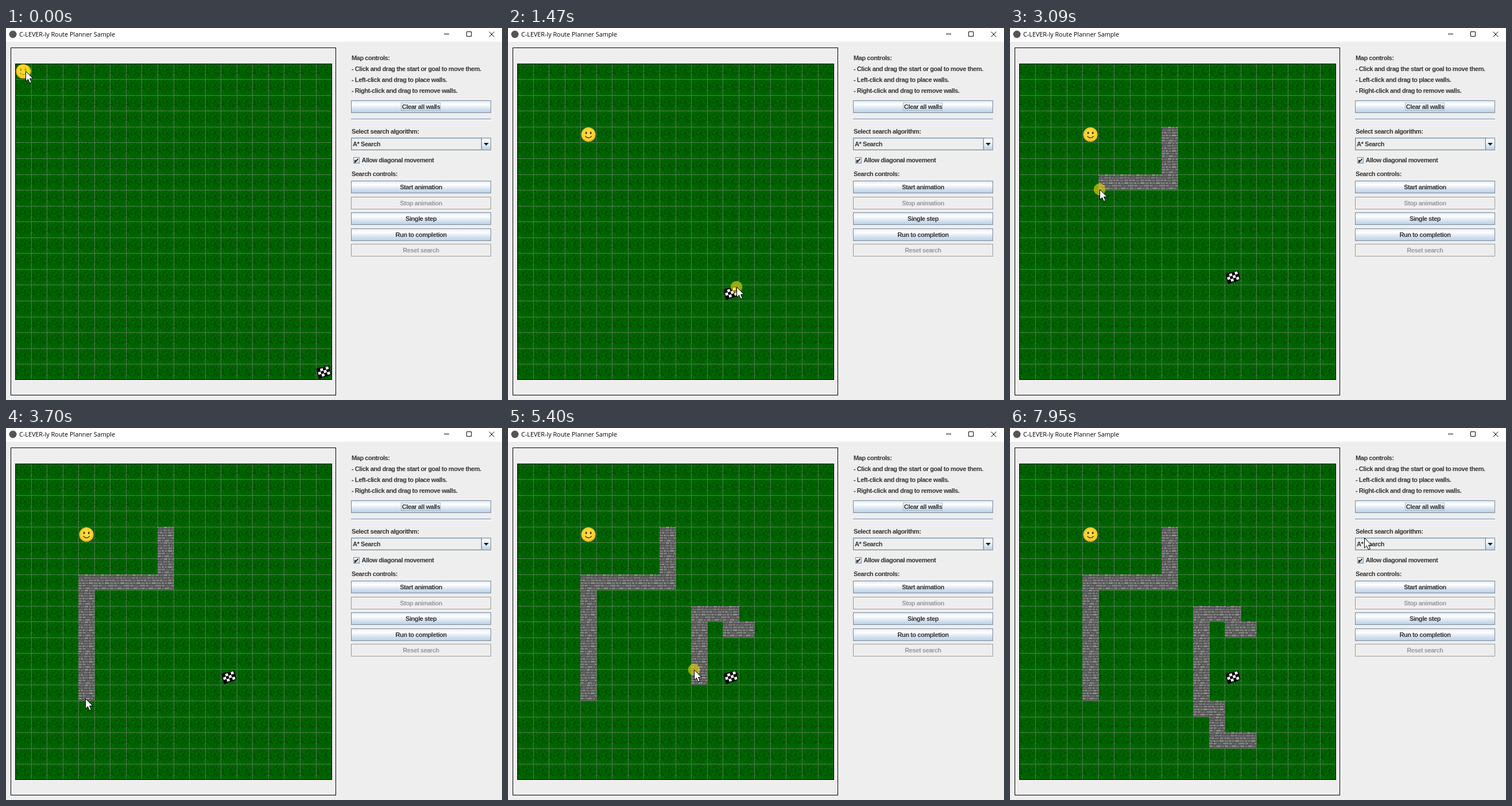
An HTML page with a canvas for the animation above (8 s loop, 864x648 px).

```html
<!DOCTYPE html>
<html lang="en">
<head>
<meta charset="utf-8">
<title>Route planner</title>
<style>
  html, body { margin: 0; width: 100%; height: 100%; overflow: hidden; background: #eee; }
  canvas, svg { position: absolute; left: 0; top: 0; }
  text { font: bold 11px "Liberation Sans", Arial, sans-serif; letter-spacing: -.43px; fill: #333; white-space: pre; }
  .title { font: 10.8px "Open Sans", sans-serif; letter-spacing: 0; fill: #000; }
  .mid { text-anchor: middle; }
  .off { fill: #999; }
</style>
</head>
<body>
<canvas id="map" width="864" height="648"></canvas>
<svg width="864" height="648" viewBox="0 0 864 648">
  <defs>
    <linearGradient id="metal" x2="0" y2="1">
      <stop offset="0" stop-color="#dde8f3"/>
      <stop offset=".3" stop-color="#fff"/>
      <stop offset=".6" stop-color="#dde8f3"/>
      <stop offset="1" stop-color="#b8cfe5"/>
    </linearGradient>
  </defs>
  <rect width="864" height="24" fill="#fff"/>
  <circle cx="12" cy="11" r="6.5" fill="#555"/>
  <text class="title" x="23" y="15">C-LEVER-ly Route Planner Sample</text>
  <path d="M763 10.5h9M802.5 6.5h8v8h-8zM841.5 6.5l9 9m0-9l-9 9" fill="none" stroke="#000"/>
  <rect x="8.5" y="34.5" width="566" height="605" fill="none" stroke="#000"/>

  <text x="602" y="56">Map controls:</text>
  <text x="602" y="75">- Click and drag the start or goal to move them.</text>
  <text x="602" y="94">- Left-click and drag to place walls.</text>
  <text x="602" y="113">- Right-click and drag to remove walls.</text>
  <path d="M601 158.5h244" stroke="#6382bf"/>
  <path d="M601 159.5h244" stroke="#fff"/>

  <text x="602" y="184">Select search algorithm:</text>
  <rect x="601.5" y="191.5" width="243" height="21" fill="#eee" stroke="#7a8a99"/>
  <rect x="602.5" y="192.5" width="225" height="19" fill="none" stroke="#b8cfe5"/>
  <rect x="828.5" y="191.5" width="16" height="21" fill="url(#metal)" stroke="#7a8a99"/>
  <path d="M832 200h9l-4.5 5z" fill="#222"/>
  <text x="604" y="206">A* Search</text>

  <rect x="605.5" y="225.5" width="10" height="10" fill="url(#metal)" stroke="#7a8a99"/>
  <path d="M608 229.5v4l5.5-5.5" fill="none" stroke="#222" stroke-width="1.8"/>
  <text x="619.5" y="234">Allow diagonal movement</text>
  <text x="602" y="258">Search controls:</text>
  <g id="buttons"></g>
  <rect x="688.5" y="130.5" width="68" height="13" fill="none" stroke="#a3b8cc"/>
  <g id="cursor">
    <circle id="press" r="10.3" fill="#f5d70a" fill-opacity=".6"/>
    <path d="M.5 .5v17.5l4-3.8 2.8 6.6 3-1.3-2.8-6.4h5.6z" fill="#fff" stroke="#000"/>
  </g>
</svg>
<script>
const $ = id => document.getElementById(id);
const ctx = $('map').getContext('2d');
const CELL = 27.55, LEFT = 16.55, TOP = 62.2, SIDE = 20, STEP = 77, LOOP = 8000;
const HOVER = 0, START = 1, GOAL = 2, WALL = 3;

// Pointer path: step, x, y and what the pointer does from there on
const path = [
  [0, 34, 75, START], [5, 146, 188, HOVER], [11, 560, 632, HOVER],
  [12.5, 553, 604, GOAL], [17, 378, 463, GOAL], [19, 398, 451, GOAL],
  [22.3, 396, 446, HOVER], [26, 158, 205, HOVER],
  [29, 276, 184, WALL], [33, 278, 250, WALL], [35, 277, 268, WALL], [39, 163, 270, WALL],
  [40, 156, 281, WALL], [41, 137, 279, WALL], [44, 134, 369, WALL],
  [47, 136, 471, HOVER], [49, 140, 470, HOVER], [55, 350, 450, HOVER], [58, 407, 358, HOVER],
  [59, 407, 356, WALL], [61, 388, 352, WALL], [62, 386, 330, WALL], [65.5, 331, 326, WALL],
  [66, 330, 334, WALL], [70, 324, 421, WALL], [73, 323, 485, WALL], [74.5, 358, 488, WALL],
  [77, 370, 525, WALL], [77.4, 370, 534, WALL], [78, 385, 545, WALL], [79, 407, 551, WALL],
  [81.5, 407, 551, HOVER], [86, 141, 120, HOVER], [88, 141, 120, HOVER], [91, 240, 101, HOVER],
  [95, 495, 204, HOVER], [96, 460, 198, HOVER], [97, 460, 198, HOVER], [103, 617, 191, HOVER],
  [105, 617, 191, HOVER]
];

function pointer(n) {
  const i = path.findIndex(p => p[0] > n);
  const [n0, x0, y0, mode] = path[i - 1], [n1, x1, y1] = path[i];
  const k = (n - n0) / (n1 - n0);
  return { x: x0 + (x1 - x0) * k, y: y0 + (y1 - y0) * k, mode };
}

let seed = 7;
const rnd = () => (seed = seed * 16807 % 2147483647) / 2147483647;

function makeTile(draw) {
  const tile = document.createElement('canvas');
  tile.width = tile.height = 28;
  draw(tile.getContext('2d'));
  return tile;
}

const grass = makeTile(c => {
  c.fillStyle = '#005e00';
  c.fillRect(0, 0, 28, 28);
  for (let i = 0; i < 420; i++) {
    const x = rnd() * 30 - 1, y = rnd() * 30 - 1, len = 1 + rnd() * 2.5;
    c.strokeStyle = `rgb(0,${62 + rnd() * 66 | 0},0)`;
    c.beginPath();
    c.moveTo(x, y);
    c.lineTo(x + len * .7, y - len);
    c.stroke();
  }
});

const brick = makeTile(c => {
  c.fillStyle = '#484848';
  c.fillRect(0, 0, 28, 28);
  for (let y = 0; y < 28; y += 4.6)
    for (let x = -rnd() * 6, w; x < 28; x += w) {
      w = 5 + rnd() * 5;
      const g = 105 + rnd() * 45 | 0;
      c.fillStyle = `rgb(${g},${g},${g})`;
      c.fillRect(x, y, w - 1, 2.2);
      c.fillStyle = '#707070';
      c.fillRect(x, y + 2.2, w - 1, 1.2);
    }
});

const edgeX = col => Math.floor(LEFT + col * CELL);
const edgeY = row => Math.floor(TOP + row * CELL);

function putTile(tile, col, row) {
  const x = edgeX(col), y = edgeY(row), w = edgeX(col + 1) - x, h = edgeY(row + 1) - y;
  ctx.drawImage(tile, 0, 0, w, h, x, y, w, h);
}

function atCell([col, row], draw) {
  ctx.save();
  ctx.translate(LEFT + (col + .5) * CELL - .4, TOP + (row + .5) * CELL - .5);
  draw();
  ctx.restore();
}

function smiley() {
  const skin = ctx.createRadialGradient(0, -3, 3, 0, 0, 13);
  skin.addColorStop(0, '#ffdf45');
  skin.addColorStop(.75, '#fdcf2f');
  skin.addColorStop(1, '#f0a31c');
  ctx.fillStyle = skin;
  ctx.beginPath();
  ctx.arc(0, 0, 12.6, 0, 7);
  ctx.fill();
  ctx.fillStyle = ctx.strokeStyle = '#553510';
  for (const x of [-4, 4]) {
    ctx.beginPath();
    ctx.ellipse(x, -3, 1.5, 2.2, 0, 0, 7);
    ctx.fill();
  }
  ctx.lineWidth = 1.4;
  ctx.beginPath();
  ctx.arc(0, -.6, 6.2, .52, Math.PI - .52);
  ctx.stroke();
}

function flag() {
  ctx.fillStyle = '#000';
  ctx.beginPath();
  ctx.moveTo(-13, -5);
  ctx.bezierCurveTo(-5, -10, 0, -6, 9, -12);
  ctx.lineTo(13, 4);
  ctx.bezierCurveTo(6, 10, 0, 7, -8, 13);
  ctx.fill();
  ctx.transform(1, -.32, .28, 1, 0, 0);
  ctx.fillStyle = '#fff';
  for (let row = 0; row < 3; row++)
    for (let col = 0; col < 4; col++)
      if ((row + col) % 2) ctx.fillRect(col * 4.8 - 9.4, row * 4.6 - 6.7, 4.6, 4.5);
}

function drawMap(n) {
  const walls = new Map();
  let start = [0, 0], goal = [19, 19];
  for (let s = 0; s <= n; s += .02) {
    const p = pointer(s);
    const cell = [Math.floor((p.x - LEFT) / CELL), Math.floor((p.y - TOP) / CELL)];
    if (p.mode === START) start = cell;
    if (p.mode === GOAL) goal = cell;
    if (p.mode === WALL) walls.set(cell.join(), cell);
  }

  for (let col = 0; col < SIDE; col++)
    for (let row = 0; row < SIDE; row++) putTile(grass, col, row);
  ctx.fillStyle = 'rgba(140,140,140,.62)';
  for (let i = 1; i < SIDE; i++) {
    ctx.fillRect(edgeX(i), 62, 1, 550);
    ctx.fillRect(16, edgeY(i), 551, 1);
  }
  for (const cell of walls.values()) putTile(brick, ...cell);
  ctx.lineWidth = 1;
  ctx.strokeStyle = '#000';
  ctx.strokeRect(16.5, 62.5, 551, 550);
  atCell(goal, flag);
  atCell(start, smiley);
}

function addButton(y, label, on) {
  $('buttons').innerHTML +=
    `<rect x="601.5" y="${y}.5" width="243" height="21" fill="${on ? 'url(#metal)' : '#eee'}" stroke="${on ? '#7a8a99' : '#999'}"/>
     <text class="mid${on ? '' : ' off'}" x="723" y="${y + 15}">${label}</text>`;
}
addButton(126, 'Clear all walls', true);
addButton(266, 'Start animation', true);
addButton(294, 'Stop animation', false);
addButton(321, 'Single step', true);
addButton(349, 'Run to completion', true);
addButton(376, 'Reset search', false);

let shown = -1;
function frame(now) {
  const n = Math.floor((now % LOOP + 5) / STEP);
  if (n !== shown) {
    shown = n;
    ctx.clearRect(0, 0, 864, 648);
    drawMap(n);
    const p = pointer(n);
    $('cursor').setAttribute('transform', `translate(${Math.round(p.x)} ${Math.round(p.y)})`);
    $('press').setAttribute('visibility', p.mode === HOVER ? 'hidden' : 'visible');
  }
  requestAnimationFrame(frame);
}
frame(0);
</script>
</body>
</html>
```
